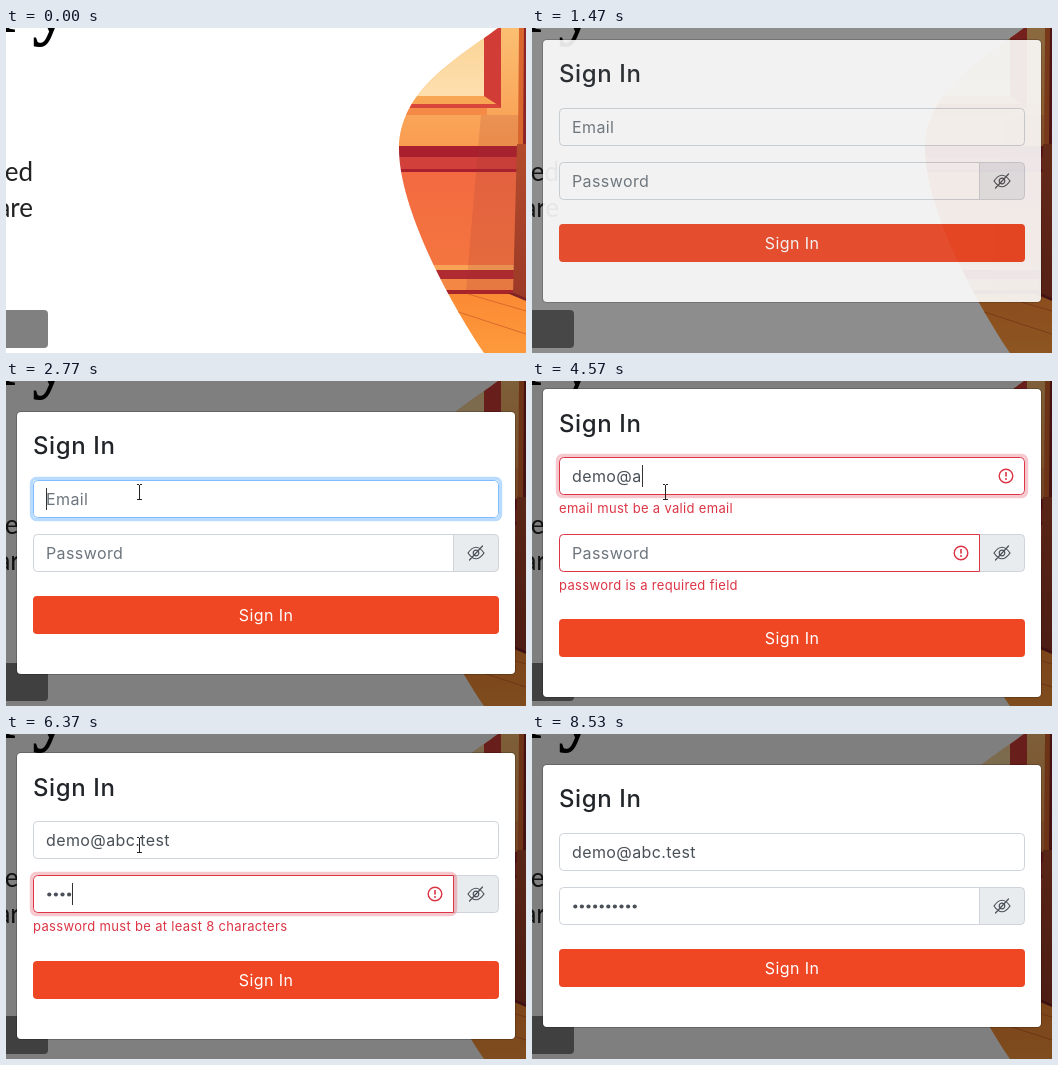
These frames come from a looping animation (520x325 px, 9.01 s). An HTML page with a canvas:

```html
<!DOCTYPE html>
<html lang="en">
<head>
<meta charset="utf-8">
<title>Sign in form</title>
<style>
  html, body { margin: 0; width: 100%; height: 100%; overflow: hidden; background: #fff; }
  canvas { display: block; width: 520px; height: 325px; }
</style>
</head>
<body>
<canvas id="stage" width="520" height="325"></canvas>
<script>
const W = 520, H = 325, LOOP = 9010;
const stage = document.getElementById('stage').getContext('2d');
const layer = () => Object.assign(document.createElement('canvas'), { width: W, height: H }).getContext('2d');
const page = layer(), dialog = layer();

const SANS = 'Inter, "Open Sans", sans-serif';
const INK = '#495057', RED = '#dc3545', BRAND = '#ef4623';

// Times of each key press
const EMAIL = 'demo@abc.test';
const EMAIL_KEYS = [3470, 3600, 3830, 3970, 4200, 4570, 4700, 4900, 5030, 5170, 5330, 5400, 5570];
const PASS_KEYS = [6000, 6100, 6200, 6370, 6450, 6530, 6700, 6800, 6900, 7030];
const OPEN = 1337, INVALID = 3470, EMAIL_OK = 5400, TAB = 5830, PASS_OK = 6800, BLUR = 8130;

// Field looks: border colour, ring colour, ring opacity
const IDLE = [206, 212, 218, 0, 123, 255, 0];
const FOCUS = [128, 189, 255, 0, 123, 255, .25];
const WRONG = [220, 53, 69, 220, 53, 69, 0];
const WRONG_FOCUS = [220, 53, 69, 220, 53, 69, .25];
const EMAIL_LOOKS = [[2770, FOCUS, 1], [INVALID, WRONG_FOCUS, 150], [EMAIL_OK, FOCUS, 150], [TAB, IDLE, 150]];
const PASS_LOOKS = [[INVALID, WRONG, 150], [TAB, WRONG_FOCUS, 150], [PASS_OK, FOCUS, 150], [BLUR, IDLE, 150]];

const clamp = v => Math.max(0, Math.min(1, v));
const mix = (a, b, k) => a + (b - a) * k;
const count = (times, t) => times.filter(at => t >= at).length;

// cubic-bezier(0, 0, .58, 1)
function easeOut(x) {
  let lo = 0, hi = 1, s = .5;
  for (let i = 0; i < 18; i++) {
    s = (lo + hi) / 2;
    if (1.74 * (1 - s) * s * s + s * s * s < x) lo = s; else hi = s;
  }
  return 3 * (1 - s) * s * s + s * s * s;
}

function lookAt(steps, t) {
  let now = IDLE;
  for (const [start, goal, span] of steps) {
    if (t < start) break;
    const k = easeOut(clamp((t - start) / span));
    now = now.map((v, i) => mix(v, goal[i], k));
  }
  return now;
}

function box(g, x, y, w, h, r, fill, line) {
  g.beginPath();
  g.roundRect(x, y, w, h, r);
  if (fill) { g.fillStyle = fill; g.fill(); }
  if (line) { g.strokeStyle = line; g.lineWidth = 1; g.stroke(); }
}

function poly(g, fill, ...p) {
  g.fillStyle = fill;
  g.beginPath();
  for (let i = 0; i < p.length; i += 2) g.lineTo(p[i], p[i + 1]);
  g.closePath();
  g.fill();
}

function text(g, str, x, y, size, color, { weight = 400, family = SANS, align = 'left', track = .025 } = {}) {
  g.font = `${weight} ${size}px ${family}`;
  g.letterSpacing = `${track * size}px`;
  g.textAlign = align;
  g.fillStyle = color;
  g.fillText(str, x, y);
  return g.measureText(str).width;
}

function shade(g, top, bottom, y0, y1) {
  const fill = g.createLinearGradient(0, y0, 0, y1);
  fill.addColorStop(0, top);
  fill.addColorStop(1, bottom);
  return fill;
}

function drawRoom(g) {
  const band = (color, y0, y1, x1 = W) => { g.fillStyle = color; g.fillRect(380, y0, x1 - 380, y1 - y0); };
  g.save();
  g.beginPath();
  g.moveTo(492, 0);
  g.bezierCurveTo(452, 30, 393, 62, 393, 121);
  g.bezierCurveTo(393, 172, 432, 256, 478, H);
  g.lineTo(W, H);
  g.lineTo(W, 0);
  g.clip();

  band(shade(g, '#fbbf72', '#f99c50', 0, 118), 0, 118);
  band(shade(g, '#fbd394', '#fddfae', 0, 68), 0, 68, 478);
  poly(g, '#f9a654', 380, 68, 478, 68, 495, 78, 380, 78);
  band('#d8453a', 76, 80, 495);
  poly(g, '#d23c36', 478, 0, 495, 0, 495, 79, 478, 68);
  band('#f58a47', 80, 87, 481);

  band(shade(g, '#f26a41', '#f4753f', 144, 237), 144, 237);
  band('#a91f2d', 118, 129);
  band('#d1403a', 129, 141);
  band('#a91f2d', 141, 144);
  band('#f9a357', 237, 242);
  band('#b02a31', 242, 251);
  band('#f58745', 251, 262);
  band('#a8242b', 262, 266);
  band(shade(g, '#fb8a34', '#fd9a3c', 266, H), 266, H);
  poly(g, 'rgba(150,50,50,.16)', 475, 87, 514, 87, 508, 262, 460, 262);

  g.strokeStyle = '#d96a2b';
  g.lineWidth = 1;
  g.beginPath();
  g.moveTo(440, 280); g.lineTo(W, 306);
  g.moveTo(462, 266); g.lineTo(W, 283);
  g.stroke();

  poly(g, '#d9662f', 513, 0, W, 0, W, 116, 512, 116);
  poly(g, shade(g, '#b24c2c', '#9c3a28', 116, 270), 511, 116, W, 116, W, 272, 507, 267);
  poly(g, '#8c2428', 518, 0, W, 0, W, 116, 517, 116);
  poly(g, '#7d2326', 501, 265, 508, 265, W, 270, W, 273);
  g.restore();
}

function drawPage(g) {
  g.fillStyle = '#fff';
  g.fillRect(0, 0, W, H);
  drawRoom(g);
  const serif = { weight: 700, family: '"Liberation Serif", serif', track: 0 };
  text(g, 'r', -14, 4, 76, '#000', serif);
  text(g, 'y', 26, 3, 76, '#000', serif);
  const body = { family: 'Lato, sans-serif', align: 'right', track: 0 };
  text(g, 'ed', 27, 153, 26, '#222', body);
  text(g, 'are', 27, 189, 26, '#222', body);
  box(g, -20, 282, 62, 38, 4, '#808080');
}

function drawEye(g, x, y) {
  g.save();
  g.translate(x, y);
  g.strokeStyle = INK;
  g.lineWidth = 1.2;
  g.lineCap = 'round';
  g.beginPath();
  g.moveTo(-8, 0);
  g.quadraticCurveTo(0, -11.5, 8, 0);
  g.quadraticCurveTo(0, 11.5, -8, 0);
  g.moveTo(2.8, 0);
  g.arc(0, 0, 2.8, 0, 7);
  g.moveTo(-6.5, 7);
  g.lineTo(6.5, -7);
  g.stroke();
  g.restore();
}

function drawAlert(g, x, y) {
  g.strokeStyle = g.fillStyle = RED;
  g.lineWidth = 1.4;
  g.beginPath();
  g.arc(x, y, 6.8, 0, 7);
  g.stroke();
  g.fillRect(x - .8, y - 4, 1.6, 4.6);
  g.beginPath();
  g.arc(x, y + 3, 1, 0, 7);
  g.fill();
}

function drawField(g, y, w, look, corners) {
  const [r, gr, b, rr, rg, rb, a] = look;
  if (a > .005) {
    g.strokeStyle = `rgba(${rr},${rg},${rb},${a * 1.1})`;
    g.lineWidth = 3.2;
    g.beginPath();
    g.roundRect(25.4, y - 1.6, w + 3.2, 41.2, 5);
    g.stroke();
  }
  box(g, 27.5, y + .5, w - 1, 37, corners, '#fff', `rgb(${r},${gr},${b})`);
}

function drawCaret(g, x, y) {
  g.fillStyle = '#333';
  g.fillRect(Math.round(x), y + 8, 1, 22);
}

function drawDialog(g, t) {
  const emailBad = t >= INVALID && t < EMAIL_OK;
  const passBad = t >= INVALID && t < PASS_OK;
  const errors = emailBad + passBad;
  const top = 30.5 - 11.25 * errors;
  const emailY = Math.round(top + 68);
  const passY = Math.round(top + 122.1 + 22.5 * emailBad);
  const buttonY = Math.round(top + 184.75 + 22.5 * errors);
  const boxY = Math.floor(top - .5);
  const boxH = Math.ceil(top + 263.5 + 22.5 * errors) - boxY;

  g.clearRect(0, 0, W, H);
  box(g, 10, boxY, 500, boxH, 5, 'rgba(0,0,0,.2)');
  box(g, 11, boxY + 1, 498, boxH - 2, 4, '#fff');
  text(g, 'Sign In', 27, Math.round(top + 42.8), 24, '#212529', { weight: 500 });

  drawField(g, emailY, 466, lookAt(EMAIL_LOOKS, t), 4);
  const typed = EMAIL.slice(0, count(EMAIL_KEYS, t));
  const width = text(g, typed || 'Email', 40, emailY + 25, 16, typed ? INK : '#6c757d');
  if (t >= 2570 && t < TAB) drawCaret(g, typed ? 40 + width : 40, emailY);
  if (emailBad) {
    drawAlert(g, 474, emailY + 19);
    text(g, 'email must be a valid email', 27, emailY + 56, 13, RED);
  }

  box(g, 446.5, passY + .5, 46, 37, [0, 4, 4, 0], '#e9ecef', '#ced4da');
  drawEye(g, 470, passY + 19);
  drawField(g, passY, 421, lookAt(PASS_LOOKS, t), [4, 0, 0, 4]);
  const dots = count(PASS_KEYS, t);
  if (!dots) text(g, 'Password', 40, passY + 25, 16, '#6c757d');
  g.fillStyle = INK;
  for (let i = 0; i < dots; i++) {
    g.beginPath();
    g.arc(43.3 + i * 6.6, passY + 19.5, 2.1, 0, 7);
    g.fill();
  }
  if (t >= TAB && t < BLUR) drawCaret(g, 40 + dots * 6.6, passY);
  if (passBad) {
    drawAlert(g, 429, passY + 19);
    const note = dots ? 'password must be at least 8 characters' : 'password is a required field';
    text(g, note, 27, passY + 56, 13, RED);
  }

  box(g, 27, buttonY, 466, 38, 4, BRAND);
  text(g, 'Sign In', 260, buttonY + 25, 16, '#fff', { align: 'center' });
}

function drawPointer(g, t) {
  if (t < 2100 || t > 8500) return;
  const k = t < BLUR ? easeOut(clamp((t - 2100) / 300)) : 1 - clamp((t - BLUR) / 370) ** 2;
  const x = Math.round(mix(-14, 133, k)), y = Math.round(mix(222, 111, k));
  const overField = x > 27 && ((y > 98 && y < 137) || (y > 152 && y < 191));
  if (overField || k === 1) {
    g.fillStyle = '#222';
    g.fillRect(x, y - 7, 1, 15);
    for (const end of [y - 8, y + 7]) {
      g.fillRect(x - 2, end, 2, 1);
      g.fillRect(x + 1, end, 2, 1);
    }
  } else {
    g.save();
    g.translate(x, y);
    g.beginPath();
    for (const [px, py] of [[0, 0], [0, 14], [3.4, 11], [5.6, 16], [7.8, 15], [5.6, 10.2], [10, 10]]) g.lineTo(px, py);
    g.closePath();
    g.fillStyle = '#000';
    g.strokeStyle = '#fff';
    g.lineWidth = 1;
    g.fill();
    g.stroke();
    g.restore();
  }
}

function render(t) {
  const g = stage;
  g.drawImage(page.canvas, 0, 0);

  const ring = clamp((t - 1200) / 120) * clamp((1460 - t) / 70);
  if (ring > 0) {
    g.globalAlpha = ring;
    g.strokeStyle = '#7db4f5';
    g.lineWidth = 3;
    g.beginPath();
    g.roundRect(-20, 280.5, 63.5, 41, 5);
    g.stroke();
    g.globalAlpha = 1;
  }

  const fade = clamp((t - OPEN) / 150);
  if (fade > 0) {
    g.fillStyle = `rgba(0,0,0,${fade / 2})`;
    g.fillRect(0, 0, W, H);
    drawDialog(dialog, t);
    g.globalAlpha = fade;
    g.drawImage(dialog.canvas, 0, Math.round(-50 * (1 - easeOut(clamp((t - OPEN) / 300)))));
    g.globalAlpha = 1;
  }
  drawPointer(g, t);
}

drawPage(page);
const begin = performance.now();
function tick() {
  render((performance.now() - begin) % LOOP);
  requestAnimationFrame(tick);
}
tick();
</script>
</body>
</html>
```
